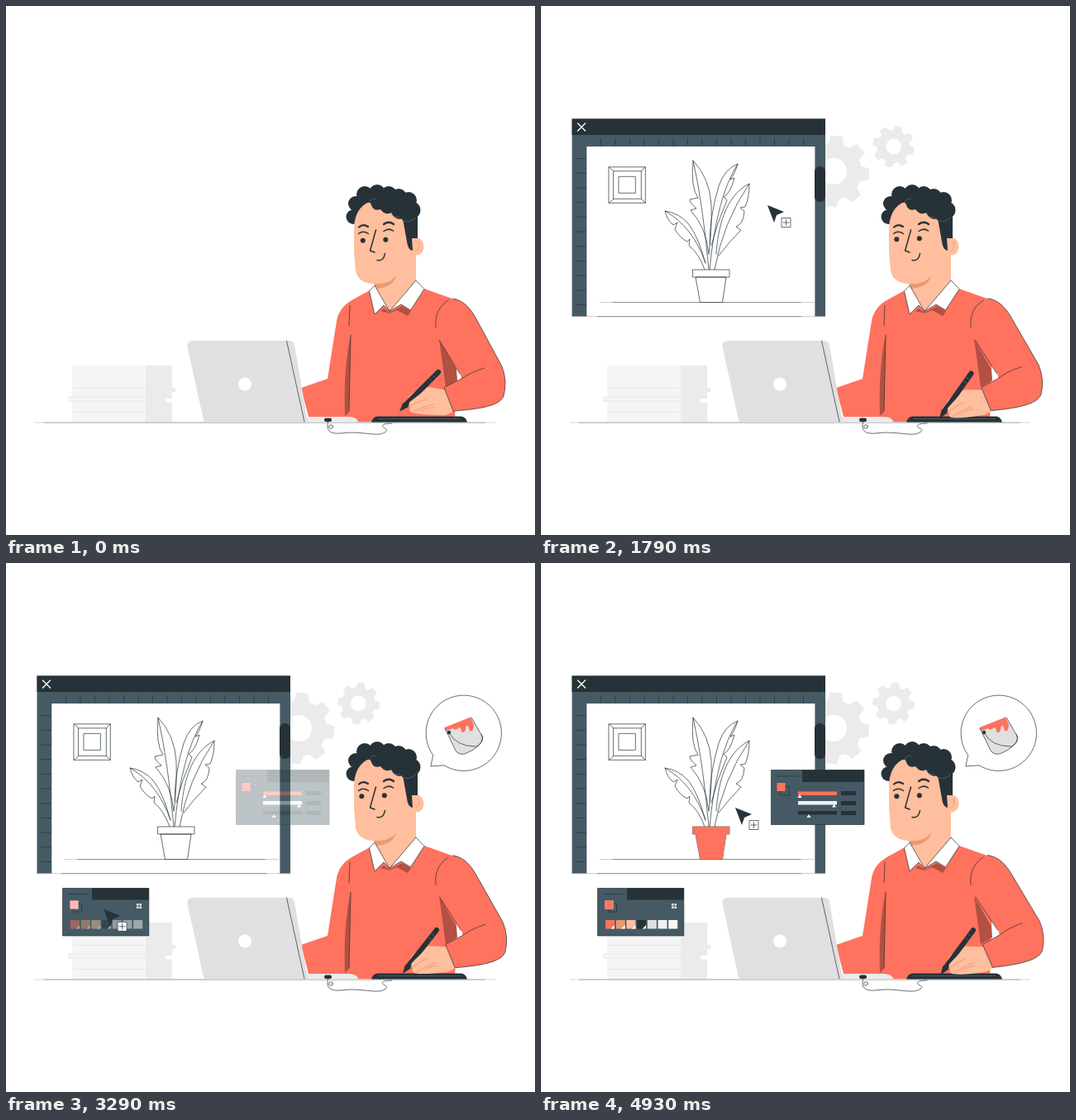
These frames come from a looping animation (640x640 px, 5000 ms). An HTML page without scripts:

```html
<!DOCTYPE html>
<html lang="en">
<head>
<meta charset="utf-8">
<title>Designer at work</title>
<style>
  html, body { margin: 0; height: 100%; overflow: hidden; background: #fff; }
  svg { display: block; width: 100vw; height: 100vh; }
  .coral { fill: #ff725e; }
  .shade { fill: #b25042; }
  .dark { fill: #263238; }
  .slate { fill: #455a64; }
  .skin { fill: #ffbe9d; }
  .tan { fill: #eb996e; }
  .white { fill: #fff; }
  .grey { fill: #e0e0e0; }
  .pale { fill: #ebebeb; }
  .line { fill: none; stroke: #263238; stroke-width: .7; stroke-linecap: round; stroke-linejoin: round; }
  .outlined { stroke: #263238; stroke-width: .7; stroke-linejoin: round; }
  .face { stroke-width: 1.5; }
  .crease { fill: none; stroke: #eb996e; stroke-width: .9; stroke-linecap: round; }
</style>
</head>
<body>
<svg viewBox="0 0 640 640">
  <defs>
    <g id="gear">
      <circle r="34"/>
      <path id="teeth" d="M-7 -43H7L10 -30V30L7 43H-7L-10 30V-30Z"/>
      <use href="#teeth" transform="rotate(45)"/>
      <use href="#teeth" transform="rotate(90)"/>
      <use href="#teeth" transform="rotate(135)"/>
      <circle r="16" class="white"/>
    </g>
    <rect id="swatch" y="432" width="11" height="10.5"/>
    <path id="pointer" class="white" d="M0 0l2.500 4h-5z"/>
    <path id="corner" class="white" d="M89 438v4.500h-4.500z"/>
  </defs>

  <!-- Gears -->
  <g transform="translate(354 200)" opacity="0">
    <animate attributeName="opacity" dur="5s" repeatCount="indefinite" values="0;0;1;1" keyTimes="0;.12;.18;1"/>
    <g class="pale">
      <animateTransform attributeName="transform" type="rotate" dur="5s" repeatCount="indefinite" values="4;4;5;10;4;7;4;4" keyTimes="0;.2;.358;.572;.714;.828;.92;1"/>
      <use href="#gear"/>
    </g>
  </g>
  <g transform="translate(426.500 170) scale(.585)" opacity="0">
    <animate attributeName="opacity" dur="5s" repeatCount="indefinite" values="0;0;1;1" keyTimes="0;.16;.26;1"/>
    <g class="pale">
      <animateTransform attributeName="transform" type="rotate" dur="5s" repeatCount="indefinite" values="8;8;14;9;5;5;5" keyTimes="0;.22;.358;.572;.714;.8;1"/>
      <use href="#gear"/>
    </g>
  </g>

  <!-- Drawing window -->
  <g opacity="0">
    <animate attributeName="opacity" dur="5s" repeatCount="indefinite" values="0;0;1;1" keyTimes="0;.01;.114;1"/>
    <path class="slate" d="M37.500 136.500H344V376H37.500z"/>
    <path class="dark" d="M37.500 136.500H344V156H37.500z"/>
    <path d="M44 141.500l10 10m0 -10l-10 10" stroke="#fff" stroke-width="1.300"/>
    <g stroke="#263238" opacity=".7">
      <path d="M72 164.500H331" stroke-width="9" stroke-dasharray="1 16.500"/>
      <path d="M48.500 184V364" stroke-width="12" stroke-dasharray="1 16.700"/>
    </g>
    <path class="white" d="M55.300 170H331.400V376H55.300z"/>
    <rect class="dark" x="331" y="194" width="13" height="43" rx="6"/>
    <path d="M38 375.700H344M71 358.600H330" stroke="#bbb" stroke-width=".8"/>
    <path class="line" d="M87 358.600H314M68 375.700H315" stroke-opacity=".6"/>
  </g>

  <!-- Framed picture -->
  <g transform="translate(104.300 216.800)" opacity="0">
    <animate attributeName="opacity" dur="5s" repeatCount="indefinite" values="0;0;1;1" keyTimes="0;.128;.19;1"/>
    <g class="line">
      <animateTransform attributeName="transform" type="scale" dur="5s" repeatCount="indefinite" values=".4;.4;.71;1;1" keyTimes="0;.128;.172;.228;1"/>
      <path d="M-22 -22H22V21.500H-22zM-16.500 -17H17V16.500H-16.500zM-10 -10.500H10V9.500H-10zM-22 -22l5.500 5M22 -22l-5 5M-22 21.500l5.500 -5M22 21.500l-5 -5"/>
    </g>
  </g>

  <!-- Plant -->
  <g class="line" opacity="0">
    <animate attributeName="opacity" dur="5s" repeatCount="indefinite" values="0;0;1;1" keyTimes="0;.242;.342;1"/>
    <path d="M203 300Q200 268 181 247L188 245Q179 237 180 234L190 232Q181 220 184 187Q204 208 206 240Q207 272 203 300M184 187Q196 240 203 319"/>
    <path d="M204 288Q204 255 215 218Q222 197 238 191Q234 204 229 210L234 208Q229 227 221 231L225 235Q213 262 206 290M238 191Q212 232 204 319"/>
    <path d="M212 300C214 270 222 230 252 215Q252 232 247 243L241 244L246 248Q245 264 236 267L242 271Q228 285 215 302M252 215Q220 262 210 319"/>
    <path d="M199 311Q190 278 178 263Q166 250 150 248Q152 258 160 265L165 262L162 270Q168 281 177 285L180 282L179 290Q191 299 198 319M150 248Q184 267 199 311"/>
  </g>
  <g opacity="0">
    <animate attributeName="opacity" dur="5s" repeatCount="indefinite" values="0;0;.25;1;1" keyTimes="0;.15;.172;.228;1"/>
    <path class="white outlined" d="M187 328L192.500 358.500H219.500L224 328zM183.500 319H228V328H183.500z"/>
    <path class="coral outlined" d="M187 328L192.500 358.500H219.500L224 328zM183.500 319H228V328H183.500z" fill-opacity="0" stroke-opacity="0">
      <animate attributeName="fill-opacity" dur="5s" repeatCount="indefinite" values="0;0;.25;1;1" keyTimes="0;.806;.828;.91;1"/>
    </path>
  </g>

  <!-- Desk and papers -->
  <path d="M35 504H592" stroke="#d5d5d5"/>
  <path d="M46 504H580" stroke="#aaa" stroke-width=".9"/>
  <path fill="#f5f5f5" d="M80 435H169V503H80z"/>
  <path class="pale" d="M169 435H201V462h4v5h-4V503H169z"/>
  <path fill="#f5f5f5" d="M75 473H169V478H75z"/>
  <path d="M81 462.500H175M75 473H169M75 478H169M81 491.500H175" stroke="#e6e6e6"/>
  <path class="white" d="M193 475h8v4.500h-8z"/>

  <!-- Torso -->
  <path class="coral" d="M440 344L420 355Q403 364 400 381L389 451L357 462L366 497H415V503H543L545 440L550 375Q548 357 537 353L506 342L464 366z"/>
  <path class="shade" d="M417 397Q408 440 410 496L415 491z"/>
  <path class="shade" d="M524 403L545 440L546 453L532 461z"/>
  <path class="line" d="M416 362L415 387M417 398L415 490"/>

  <!-- Head -->
  <g class="dark">
    <path d="M417 256Q424 226 458 222Q490 226 496 252z"/>
    <circle cx="420.500" cy="255" r="9"/>
    <circle cx="423" cy="239" r="9"/>
    <circle cx="434" cy="228" r="10"/>
    <circle cx="449" cy="226" r="10"/>
    <circle cx="463" cy="228" r="10"/>
    <circle cx="475" cy="231" r="10"/>
    <circle cx="487" cy="235" r="10"/>
    <circle cx="491" cy="247" r="10.500"/>
  </g>
  <ellipse class="skin" cx="497" cy="291" rx="8.500" ry="10.500"/>
  <path class="crease" d="M494 292Q495 284 499 286Q502 291 496 297"/>
  <path class="skin" d="M437 238Q422 246 421 268V296L423 321Q427 336 446 336L447 343L464 369L496 333V296L498 255Q480 234 437 238z"/>
  <path class="tan" d="M445 336Q465 337 472 326Q469 340 448 342z"/>
  <path class="dark" d="M428 240Q440 233 442 241Q445 249 453 246Q459 254 466 250Q471 260 480 257L485 285Q486 295 492 296L491 281H498V255L490 228L440 226z"/>
  <circle class="dark" cx="486" cy="253" r="9"/>
  <path d="M440 238Q442 231 448 234M466 250Q468 257 476 255M478 257Q484 265 496 256" fill="none" stroke="#66757c" stroke-width=".6"/>
  <g class="line face">
    <path d="M427 267.500Q432 263 438 267M457 264Q463 259.500 469 264" stroke-width="2.200"/>
    <path d="M426.500 275.500Q432 271 438.500 275.500M457 272.500Q463 268 468.500 272"/>
    <path d="M447.500 271L440.500 296L446 298M449 307.500Q457 309 458.500 299.500"/>
  </g>
  <g class="dark">
    <animate attributeName="opacity" dur="5s" repeatCount="indefinite" values="1;1;.1;1;1;.1;1;1" keyTimes="0;.06;.172;.286;.658;.771;.886;1"/>
    <animateTransform attributeName="transform" type="translate" dur="5s" repeatCount="indefinite" values="1.5 1.5;1.5 1.5;0 0;0 0" keyTimes="0;.17;.29;1"/>
    <circle cx="430.300" cy="282.300" r="3"/>
    <circle cx="457.800" cy="281.300" r="3"/>
  </g>

  <!-- Collar -->
  <path class="shade" d="M446 374L457 366L464 371L479 363L490 369L486 375L473 368L464 372L453 369z"/>
  <path class="white outlined" d="M439.500 345L446 338L464 369.500L457 362L446 373zM464 369.500L496 332L506 342.500L489.500 368L478 361z"/>

  <!-- Laptop and tablet -->
  <path class="pale" d="M361 497H415Q425 497 426 503.500H361z"/>
  <path class="grey" d="M226 405H343Q348 405 349 410L365 503.500H241L239 501L219.500 412Q219 405 226 405z"/>
  <path class="line" d="M339.500 405L361 503"/>
  <circle class="white" cx="289" cy="457.500" r="8"/>
  <rect class="dark" x="385" y="498.500" width="9" height="4.500" rx="2"/>
  <path class="line" d="M389.500 503C387 514 392 518 405 517C425 514 440 519 452 518C465 515 460 511 458 511C452 507 457 505 467 505"/>
  <circle class="line" cx="393" cy="509" r="2.300"/>
  <path class="dark" d="M442 503.500Q444 497 449 496.500H551Q556 497 558 503.500z"/>
  <path d="M450 499.500H550" stroke="#66757c" stroke-width=".6"/>

  <!-- Drawing arm -->
  <g>
    <animateTransform attributeName="transform" type="rotate" dur="5s" repeatCount="indefinite"
      values="0 530 365;-.6 530 365;1.3 530 365;1.3 530 365;-1.6 530 365;-2.7 530 365;1.3 530 365;-2.5 530 365;-4 530 365;-4 530 365;-1 530 365;-2.5 530 365;-2.5 530 365"
      keyTimes="0;.06;.12;.234;.358;.44;.572;.714;.78;.828;.9;.986;1"/>
    <g>
      <animateTransform attributeName="transform" type="rotate" dur="5s" repeatCount="indefinite"
        values="0 530 478;-3 530 478;-5.5 530 478;-5.5 530 478;-8 530 478;-5 530 478;-5.5 530 478;-6 530 478;-2 530 478;-1 530 478;-4 530 478;-6 530 478;-6 530 478"
        keyTimes="0;.06;.12;.234;.358;.44;.572;.714;.78;.828;.9;.986;1"/>
      <path class="skin" d="M534 465L512 461Q498 463 490 470Q484 477 484 482L489 485Q486 490 492 492Q502 495 530 495Q540 493 541 489L546 478z"/>
      <path d="M523 443L484 482" stroke="#263238" stroke-width="6.200" stroke-linecap="round"/>
      <path class="dark" d="M476 490.500L480.500 480L487 485z"/>
      <path d="M516 446.500l3.500 3.500M512 450.500l3.500 3.500" stroke="#66757c" stroke-width=".7"/>
      <path class="skin" d="M489 484Q485 481 491 477L508 464L520 470L510 485z"/>
      <path class="crease" d="M488 484Q499 478 508 476M492 491Q504 485 517 482M502 490Q510 485 519 486"/>
    </g>
    <path class="coral" d="M524 404L550 446L551 451L530 461.500L541 490C568 488 597 485 602 472Q607 454 600 436L567 375C558 360 550 356 541 354C528 356 518 368 520 392z"/>
    <path class="line" d="M541 354C550 356 558 360 567 375L600 436Q607 454 602 472C597 485 568 488 541 490L530 461.500L551 451Q562 443 579 438M524 404L549 445"/>
  </g>
  <path class="line" d="M520 389C518 372 526 362 535 356"/>

  <!-- Swatch panel -->
  <g opacity="0">
    <animate attributeName="opacity" dur="5s" repeatCount="indefinite" values="0;0;1;1" keyTimes="0;.41;.51;1"/>
    <path class="slate outlined" d="M68.500 393.500H172.800V451H68.500z"/>
    <path class="dark" d="M104 393.500H172.800V407.500H104z"/>
    <path class="line" d="M76 400.500H99M82 412.500H91.500V422H82z"/>
    <path class="white" d="M77.500 408.500h10v10h-10zM158 412h2.500v2.500h-2.500zm3.500 0h2.500v2.500h-2.500zm-3.500 3.500h2.500v2.500h-2.500zm3.500 0h2.500v2.500h-2.500z"/>
    <g opacity="0">
      <animate attributeName="opacity" dur="5s" repeatCount="indefinite" values="0;0;1;1" keyTimes="0;.59;.73;1"/>
      <path class="coral" d="M77.500 408.500h10v10h-10z"/>
      <use href="#swatch" x="78" class="coral"/>
      <use href="#swatch" x="90.700" class="tan"/>
      <use href="#swatch" x="103.400" class="skin"/>
      <use href="#swatch" x="116.100" class="dark"/>
      <use href="#swatch" x="128.800" class="grey"/>
      <use href="#swatch" x="141.500" fill="#f0f0f0"/>
      <use href="#swatch" x="154.200" fill="#fafafa"/>
      <use href="#corner"/>
      <use href="#corner" x="12.700"/>
      <use href="#corner" x="25.400"/>
      <use href="#corner" x="38.100"/>
    </g>
  </g>

  <!-- Speech bubble -->
  <g opacity="0">
    <animate attributeName="opacity" dur="5s" repeatCount="indefinite" values="0;0;1;1" keyTimes="0;.43;.53;1"/>
    <path class="white outlined" d="M516.700 232.500A45.700 45.700 0 1 1 530 244.800L513.800 246z"/>
    <path class="grey" d="M531 200L563 187L577 211Q575 223 555 231Q547 232 544 227z"/>
    <path class="coral" d="M530.500 199L562 186.500L566 196Q565 205 561 203C559 194 556 196 556 202Q554 207 551 204Q550 197 547 200Q543 203 541 200L533 203z"/>
    <path class="line" d="M531 200L544 227Q547 232 555 231Q575 223 577 211L563 187M536 205Q544 222 569 222Q580 217 575 207"/>
    <circle class="dark" cx="536" cy="205" r="2.200"/>
  </g>

  <!-- Slider panel -->
  <g opacity="0">
    <animate attributeName="opacity" dur="5s" repeatCount="indefinite" values="0;0;.87;1;1" keyTimes="0;.62;.714;.74;1"/>
    <path class="slate outlined" d="M278.500 250.500H391V316.500H278.500z"/>
    <path class="dark" d="M316 250.500H391V265H316zM311 300h47v4.500h-47zM363 276h18v5h-18zM363 288h18v5h-18zM363 300h18v5h-18z"/>
    <path class="line" d="M286 258H311M290 270.500H300.500V281H290z"/>
    <path class="coral" d="M285.500 266h10v10h-10zM311 276.500h47v4.500h-47z"/>
    <path fill="#f0f0f0" d="M311 288h47v4.500h-47z"/>
    <use href="#pointer" x="313" y="280"/>
    <use href="#pointer" x="354.500" y="291.500"/>
    <use href="#pointer" x="324" y="304"/>
  </g>

  <!-- Cursor -->
  <g opacity="0">
    <animate attributeName="opacity" dur="5s" repeatCount="indefinite" values="0;0;1;1" keyTimes="0;.28;.342;1"/>
    <g>
      <animateTransform attributeName="transform" type="translate" dur="5s" repeatCount="indefinite" calcMode="spline"
        values="274 241;274 241;159.500 415.500;159.500 415.500;103 420;103 420;288 269;288 269;235 296;235 296"
        keyTimes="0;.37;.53;.6;.69;.72;.81;.85;.986;1"
        keySplines="0 0 1 1;.4 0 .6 1;0 0 1 1;.4 0 .6 1;0 0 1 1;.4 0 .6 1;0 0 1 1;.4 0 .6 1;0 0 1 1"/>
      <path class="dark" d="M0 0L20 8L11 12L8 21z"/>
      <path class="white outlined" d="M17 15.500h11v11h-11z"/>
      <path class="line" d="M22.500 17.500v7m-3.500 -3.500h7"/>
    </g>
  </g>
</svg>
</body>
</html>
```
